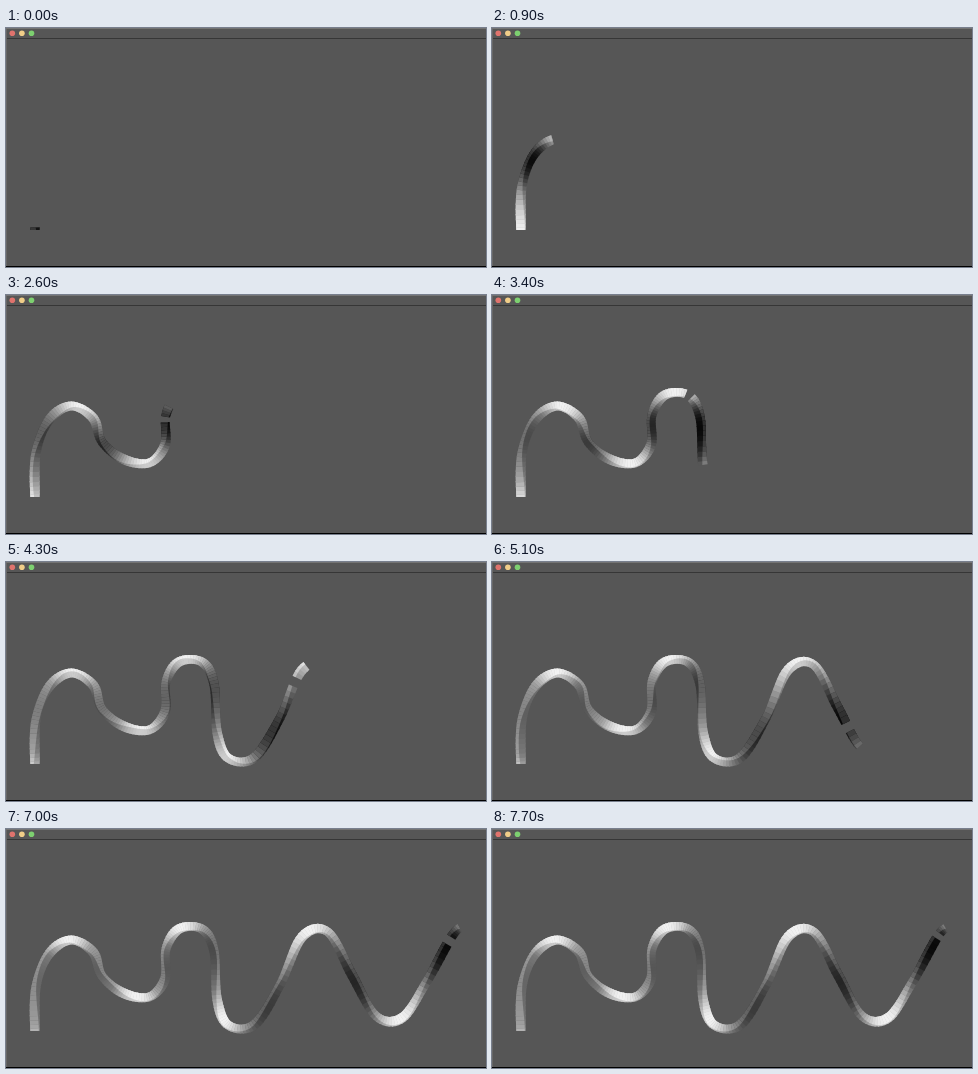
These frames come from a looping animation (480 px wide and 239 px high, 7800 ms). An HTML page with a canvas:

```html
<!DOCTYPE html>
<html lang="en">
<head>
<meta charset="utf-8">
<title>Growing ribbon</title>
<style>
  html, body { margin: 0; width: 100%; height: 100%; overflow: hidden; background: #565656; }
  canvas { display: block; width: 480px; height: 239px; }
</style>
</head>
<body>
<canvas id="stage" width="480" height="239"></canvas>
<script>
const ctx = document.getElementById('stage').getContext('2d');
const LOOP = 7800, STEP = 100, TAU = Math.PI * 2;
const SLICE = .2, OVERLAP = .05, BAND = 7;

// Key points of the centre line; positions along it count half spans.
const knots = [
  [29, 202], [30, 158], [43, 125], [65, 111], [87, 123], [96, 147], [117, 164], [143, 168],
  [159, 150], [160, 120], [173, 100], [196, 100], [208, 122], [211, 170], [222, 196], [248, 196],
  [274, 156], [296, 108], [322, 103], [346, 146], [370, 187], [396, 189], [420, 154], [446, 107],
  [458, 97]
];
const END = 47;

// Time to head position: the drawing hand pauses now and then.
const growth = [[0, .2], [1700, 10.4], [3400, 26], [4800, 39], [5100, 39.8], [5600, 45.6], [6300, END]];

const clamp = (v, lo, hi) => Math.max(lo, Math.min(hi, v));

function headAt(time) {
  const i = growth.findIndex(key => key[0] > time);
  if (i < 0) return END;
  const [t0, u0] = growth[i - 1], [t1, u1] = growth[i];
  return u0 + (u1 - u0) * (time - t0) / (t1 - t0);
}

// Catmull-Rom point on the centre line.
function pointAt(u) {
  const last = knots.length - 1;
  const i = clamp(Math.floor(u / 2), 0, last - 1), k = u / 2 - i;
  const [a, b, c, d] = [-1, 0, 1, 2].map(n => knots[clamp(i + n, 0, last)]);
  return [0, 1].map(n => b[n] + .5 * k * (c[n] - a[n] +
    k * (2 * a[n] - 5 * b[n] + 4 * c[n] - d[n] + k * (3 * (b[n] - c[n]) + d[n] - a[n]))));
}

// Maps a side from -1 (right of travel) to 1 (left) to a point across the ribbon.
function sectionAt(u) {
  const [x, y] = pointAt(u);
  const [x0, y0] = pointAt(Math.max(0, u - .1));
  const [x1, y1] = pointAt(u + .1);
  const scale = (4.7 + .3 * Math.sin(u * 1.7)) / Math.hypot(x1 - x0, y1 - y0);
  return side => [x + (y1 - y0) * scale * side, y + (x0 - x1) * scale * side];
}

// Light and dark bands; the dark ones fade as the head moves away.
function greyAt(u, head) {
  const behind = head - u;
  const wave = Math.cos(TAU * (u + .03 * behind) / BAND);
  const depth = wave > 0 ? 82 : 120 * Math.exp(-behind / 25);
  return (150 + depth * wave) * Math.min(1, .1 + head / 2);
}

// A break trails the head, swinging back and forth once the ribbon is long enough.
function breakAt(time, head) {
  const swing = Math.max(0, Math.cos(TAU * (time - 6300) / 2900));
  return { center: head - 1 - .113 * head * swing, half: head > 12 ? .2 + .15 * swing : 0 };
}

// The ridge between the lit and the shaded face weaves along the ribbon.
const ridgeAt = (u, head) => -.2 + .6 * Math.sin(u * .9 - head * .3);

function face(grey, points) {
  const g = Math.round(clamp(grey, 0, 255));
  ctx.fillStyle = `rgb(${g},${g},${g})`;
  ctx.beginPath();
  for (const p of points) ctx.lineTo(...p);
  ctx.fill();
}

function drawSlice(u0, u1, head) {
  const grey = greyAt((u0 + u1) / 2, head);
  const end = Math.min(head, u1 + OVERLAP);
  const from = sectionAt(u0), to = sectionAt(end);
  face(grey - 28, [from(1), to(1), to(-1), from(-1)]);
  face(grey + 10, [from(1), to(1), to(ridgeAt(end, head)), from(ridgeAt(u0, head))]);
}

function drawRibbon(time) {
  const head = headAt(time), gap = breakAt(time, head);
  const tail = gap.center - gap.half, tip = gap.center + gap.half;
  const run = (start, stop) => {
    for (let u = start; u < stop; u += SLICE) drawSlice(u, Math.min(stop, u + SLICE), head);
  };
  run(0, Math.max(0, tail));
  run(Math.max(0, tip), head);
}

function rect(color, x, y, w, h) {
  ctx.fillStyle = color;
  ctx.fillRect(x, y, w, h);
}

function drawWindow() {
  rect('#565656', 0, 0, 480, 239);
  rect('#747474', 0, 0, 480, 1);
  rect('#363636', 0, 10, 480, 1);
  rect('#686868', 0, 1, 1, 237);
  rect('#000', 0, 238, 480, 1);
  ['#e0736d', '#f0cd88', '#7dd070'].forEach((color, i) => {
    ctx.fillStyle = color;
    ctx.beginPath();
    ctx.arc(6.3 + i * 9.6, 5.2, 2.8, 0, TAU);
    ctx.fill();
  });
}

const start = performance.now();
function tick() {
  const time = (performance.now() - start) % LOOP;
  drawWindow();
  drawRibbon(Math.floor(time / STEP) * STEP);
  requestAnimationFrame(tick);
}
tick();
</script>
</body>
</html>
```
